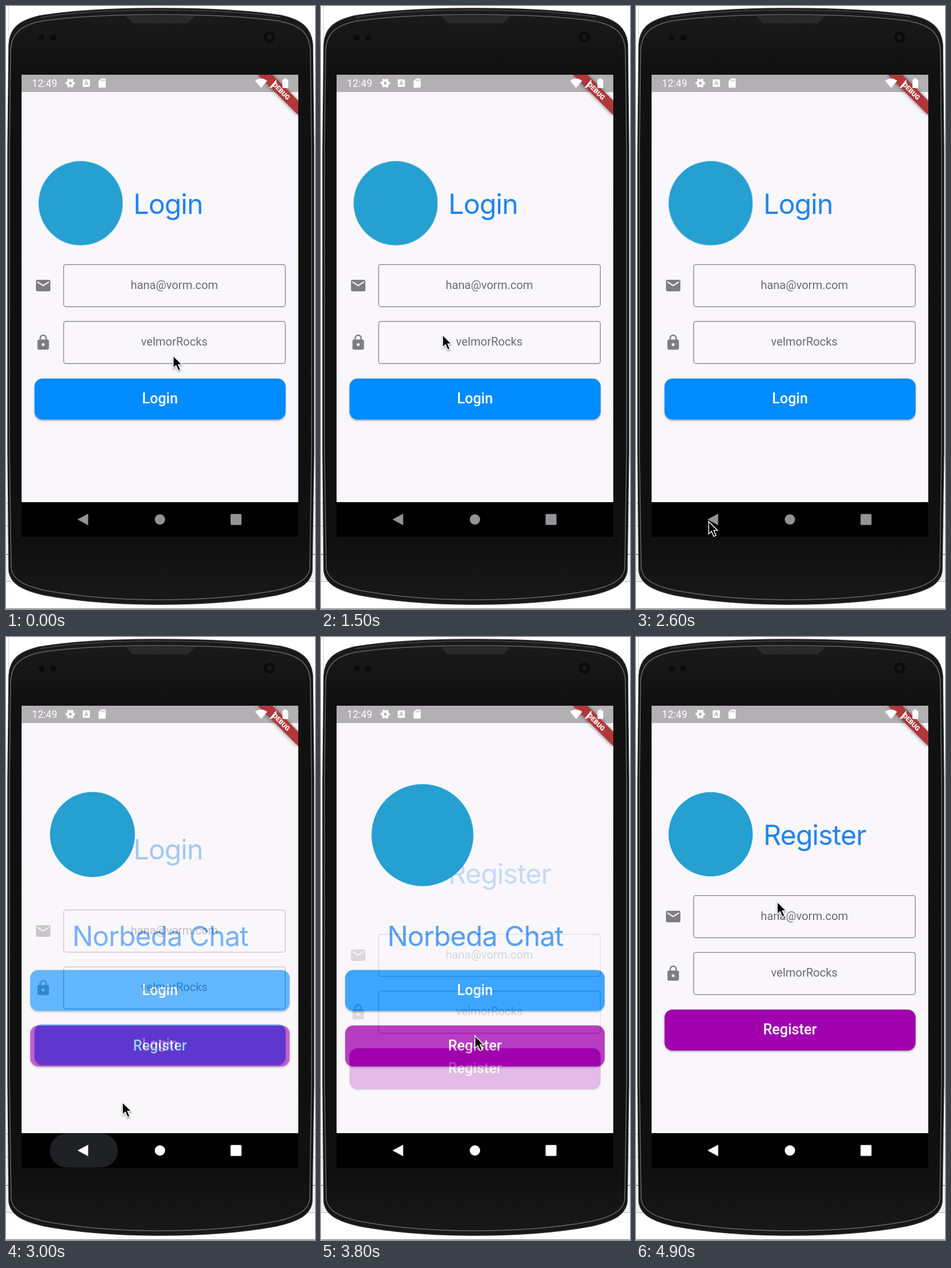
Write an HTML page that moves like this. It is 536 px wide and 1044 px high and loops after 5000 ms.

```html
<!DOCTYPE html>
<html lang="en">
<head>
<meta charset="utf-8">
<title>Login and register screens</title>
<style>
html, body { margin: 0; width: 100%; height: 100%; overflow: hidden; background: #fff; }
svg { display: block; width: 100vw; height: 100vh; }
text { font-family: Roboto, sans-serif; text-anchor: middle; }

.title { font: 400 48px Inter, sans-serif; letter-spacing: -1px; fill: #2383ee; }
.start { text-anchor: start; }
.hint { font-size: 20px; fill: #6d6b6e; }
.label { font-size: 25px; font-weight: 500; fill: #fff; }
.clock { font-size: 17.6px; fill: #fff; text-anchor: start; }
.debug { font-size: 11.5px; font-weight: 900; fill: #fff; }
.page { fill: #f9f7fb; }
.field { fill: none; stroke: #7f7d80; stroke-width: 1.25; }
.blue { fill: #008bff; }
.purple { fill: #a000ae; }
.button { filter: drop-shadow(0 2px 1.5px rgba(0, 0, 0, .3)); }

/* Every change lands on a 100 ms tick */
.anim { animation: 5s step-end -10ms infinite; }
#login { animation-name: login; }
#register { animation-name: register; }
#logo { animation-name: logo; }
#nav { animation-name: nav; }
#ripple { animation-name: ripple; }
#cursor { animation-name: cursor; }

@keyframes login {
  0% { opacity: 1; transform: translateY(0); }
  58% { opacity: .95; transform: translateY(1px); }
  60% { opacity: .4; transform: translateY(25px); }
  62% { opacity: .12; transform: translateY(130px); }
  64%, 100% { opacity: 0; transform: translateY(185px); }
}
@keyframes register {
  0% { opacity: 0; transform: translateY(185px); }
  76% { opacity: .25; transform: translateY(67px); }
  78% { opacity: .65; transform: translateY(9px); }
  80%, 100% { opacity: 1; transform: translateY(0); }
}
@keyframes logo {
  0% { transform: translate(129.5px, 341.5px); }
  60% { transform: translate(150px, 342px) scale(1.01); }
  62% { transform: translate(226px, 343px) scale(1.31); }
  64% { transform: translate(267px, 344px) scale(1.56); }
  76% { transform: translate(176px, 343px) scale(1.21); }
  78% { transform: translate(136px, 342px) scale(1.05); }
  80%, 100% { transform: translate(129.5px, 341.5px); }
}
@keyframes nav {
  0% { fill: #959396; }
  54%, 100% { fill: #fff; }
}
@keyframes ripple {
  0% { opacity: 0; }
  56% { opacity: .6; }
  58% { opacity: 1; }
  62% { opacity: .5; }
  64% { opacity: .12; }
  66%, 100% { opacity: 0; }
}
@keyframes cursor {
  0% { transform: translate(290px, 605px); animation-timing-function: steps(6); }
  12% { transform: translate(265px, 492px); animation-timing-function: steps(4); }
  20% { transform: translate(252px, 462px); animation-timing-function: steps(2); }
  24% { transform: translate(240px, 482px); animation-timing-function: steps(3); }
  30% { transform: translate(211px, 569px); animation-timing-function: steps(3); }
  36% { transform: translate(160px, 614px); animation-timing-function: steps(6); }
  48% { transform: translate(128px, 944px); }
  50% { transform: translate(128px, 932px); }
  52% { transform: translate(126px, 892px); }
  56% { transform: translate(126px, 892px); animation-timing-function: steps(2); }
  60% { transform: translate(202px, 805px); animation-timing-function: steps(2); }
  64% { transform: translate(290px, 641px); animation-timing-function: steps(4); }
  72% { transform: translate(270px, 688px); animation-timing-function: steps(2); }
  76% { transform: translate(267px, 690px); animation-timing-function: steps(4); }
  84% { transform: translate(262px, 672px); animation-timing-function: steps(7); }
  98%, 100% { transform: translate(245px, 458px); }
}
</style>
</head>
<body>
<svg viewBox="0 0 536 1044" preserveAspectRatio="none">
  <defs>
    <linearGradient id="shell" x2="0" y2="1">
      <stop offset="0" stop-color="#1b1b1c"/>
      <stop offset=".1" stop-color="#111112"/>
      <stop offset=".9" stop-color="#101011"/>
      <stop offset="1" stop-color="#19191a"/>
    </linearGradient>
    <pattern id="mesh" width="4" height="4" patternUnits="userSpaceOnUse">
      <path d="M0 4 4 0M0 0 4 4" stroke="#3c3c3e" stroke-width=".8"/>
    </pattern>
    <clipPath id="view"><path d="M27 119h480v740H27z"/></clipPath>
    <clipPath id="screen"><path d="M27 119h480v800H27z"/></clipPath>

    <g id="form">
      <rect class="page" x="27" y="119" width="480" height="740"/>
      <g fill="#7f7d80">
        <path transform="translate(49.5 469) scale(1.25)" d="M20 4H4c-1.1 0-2 .9-2 2v12c0 1.1.9 2 2 2h16c1.1 0 2-.9 2-2V6c0-1.1-.9-2-2-2zm0 4-8 5-8-5V6l8 5 8-5z"/>
        <path transform="translate(49.5 567.5) scale(1.25)" d="M18 8h-1V6A5 5 0 0 0 7 6v2H6c-1.1 0-2 .9-2 2v10c0 1.1.9 2 2 2h12c1.1 0 2-.9 2-2V10c0-1.1-.9-2-2-2zm-6 9a2 2 0 1 1 0-4 2 2 0 0 1 0 4zm3.1-9H8.9V6a3.1 3.1 0 0 1 6.2 0z"/>
      </g>
      <rect class="field" x="100" y="447.5" width="384.5" height="73" rx="4"/>
      <rect class="field" x="100" y="546" width="384.5" height="73" rx="4"/>
      <text class="hint" x="292" y="489.5">hana@vorm.com</text>
      <text class="hint" x="292" y="588">velmorRocks</text>
    </g>
    <rect id="wide" class="button" x="42" width="450" height="71" rx="14"/>
    <rect id="slim" class="button" x="49.5" y="645" width="435.5" height="71" rx="14"/>
  </defs>

  <!-- Desktop behind the phone -->
  <path fill="#fff" d="M0 0h536v1044H0z"/>
  <path fill="#efeff0" d="M0 860h536v137H0z"/>
  <g fill="none" stroke="#b5b5b7">
    <path d="M4.500 0v60" stroke="#d0d0d2"/>
    <path d="M0 860.500h536M0 900.500h536M0 996.500h536"/>
    <path d="M0 949.500h536" stroke="#55555a"/>
    <path d="M0 1043.500h536" stroke="#777"/>
  </g>

  <!-- Phone body -->
  <path fill="url(#shell)" stroke="#29292a" stroke-width="1.500" d="M5 66C7 40 20 26 58 17 120 7 200 4 268 4s148 3 208 12c38 8 53 22 56 50l2 180v527l-3 205c-3 22-22 33-62 42-60 11-130 16-201 16s-141-5-201-16c-40-9-59-20-62-42L3 773V246z"/>
  <path fill="none" stroke="#626264" stroke-width="1.600" d="M8 78c1-28 14-44 54-52 64-9 134-11 206-11s142 2 206 11c40 8 53 24 54 52l2 168v527l-3 201c-3 19-22 30-60 38-60 11-129 16-199 16s-139-5-199-16c-38-8-57-19-60-38L6 773V246z"/>
  <path fill="none" stroke="#444446" stroke-width="1.500" d="M60 20C120 10 200 7 268 7s148 3 208 12"/>
  <path fill="#1e1e1f" d="M208 17h120l-13 13H221z"/>
  <path fill="url(#mesh)" d="M208 17h120l-13 13H221z"/>
  <g fill="#0b0b0c" stroke="#1c1c1e">
    <circle cx="62" cy="55" r="6"/>
    <circle cx="82" cy="55" r="6"/>
    <circle cx="457" cy="54" r="10.500"/>
    <circle cx="457" cy="54" r="4" fill="#19191d"/>
  </g>

  <!-- App pages -->
  <g clip-path="url(#view)">
    <rect class="page" x="27" y="119" width="480" height="740"/>
    <text class="title" x="267.500" y="535">Norbeda Chat</text>
    <use class="blue" href="#wide" y="576.500"/>
    <use class="purple" href="#wide" y="672.500"/>
    <text class="label" x="267" y="620">Login</text>
    <text class="label" x="267" y="716">Register</text>

    <g id="login" class="anim">
      <use href="#form"/>
      <text class="title start" x="221" y="359.500">Login</text>
      <use class="blue" href="#slim"/>
      <text class="label" x="267" y="688">Login</text>
    </g>
    <g id="register" class="anim">
      <use href="#form"/>
      <text class="title start" x="221" y="359.500">Register</text>
      <use class="purple" href="#slim"/>
      <text class="label" x="267" y="688">Register</text>
    </g>
    <circle id="logo" class="anim" r="73" fill="#269fd1"/>
  </g>

  <!-- Status bar and corner banner -->
  <g clip-path="url(#screen)">
    <path fill="#b2b0b3" d="M27 119h480v30H27z"/>
    <path fill="#b0373a" d="M437 119h25l45 45v25z" style="filter:drop-shadow(0 1px 3px rgba(0,0,0,.5))"/>
    <text class="debug" transform="translate(477.500 147.500) rotate(45)" y="4">DEBUG</text>
  </g>
  <text class="clock" x="45" y="140">12:49</text>
  <g fill="#fff">
    <circle cx="111.500" cy="133.500" r="4.500" fill="none" stroke="#fff" stroke-width="4"/>
    <circle cx="111.500" cy="133.500" r="7" fill="none" stroke="#fff" stroke-width="2.500" stroke-dasharray="3.665" stroke-dashoffset="1.800"/>
    <rect x="133" y="127" width="12.500" height="13" rx="1.500"/>
    <path d="M136.300 137 139.250 130 142.200 137M137.500 134.700h3.500" fill="none" stroke="#b2b0b3" stroke-width="1.300"/>
    <path d="M165 125.500h6.500q1.500 0 1.500 1.500v13q0 1.500-1.500 1.500h-9.500q-1.500 0-1.500-1.500V130z"/>
    <path d="M165.500 127.500v3M168 127.500v3M170.500 127.500v3" stroke="#b2b0b3" stroke-width="1.200"/>
    <path d="M432 129.500q10.500-8 21 0L442.500 142z"/>
    <path d="M457 141.500 469 127v6l-8 8.500z"/>
    <path d="M482.500 125h3.500v2h2q1.500 0 1.500 1.500v12q0 1.500-1.500 1.500h-7q-1.500 0-1.500-1.500v-12q0-1.500 1.500-1.500h1.500z"/>
  </g>

  <!-- Navigation bar -->
  <path d="M27 859h480v60H27z"/>
  <rect id="ripple" class="anim" x="76" y="859.500" width="118" height="59" rx="29.500" fill="#1f2124"/>
  <g id="nav" class="anim">
    <path d="M124 889 142.500 879v20z"/>
    <circle cx="267" cy="889" r="9"/>
    <rect x="389.500" y="879.500" width="19" height="19" rx="1.500"/>
  </g>

  <g id="cursor" class="anim">
    <path d="M0 .5v21.500l4.900-4.600 3.900 9 4-1.700-3.900-8.800h6.600z" stroke="#fff" stroke-width="1.400" style="filter:drop-shadow(0 2px 1.500px rgba(0,0,0,.35))"/>
  </g>
</svg>
</body>
</html>
```
